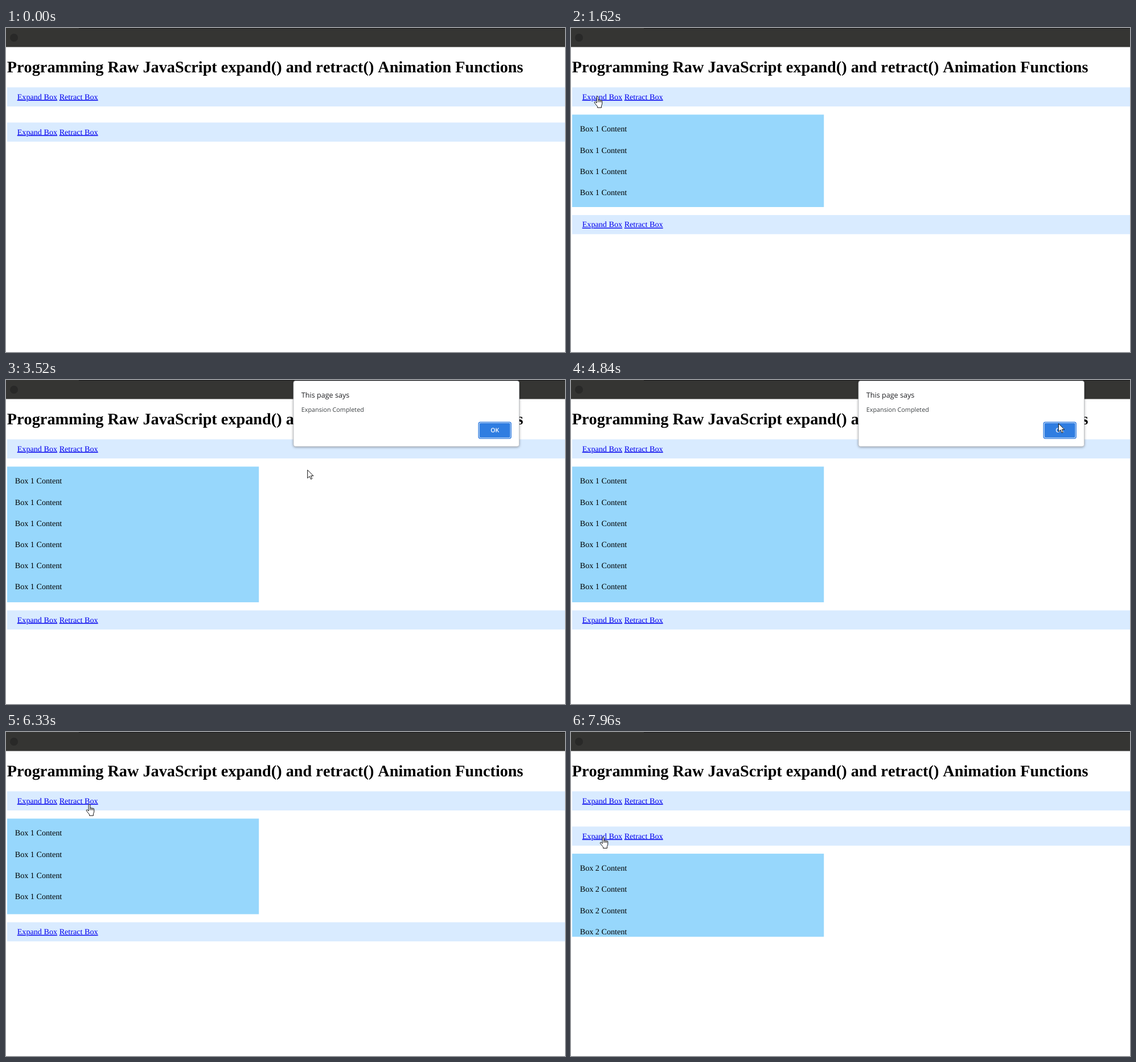
Recreate the animation shown at these times as an HTML page. Size 982x570 px, loop 8000 ms.

```html
<!DOCTYPE html>
<html lang="en">
<head>
<meta charset="utf-8">
<title>expand() and retract()</title>
<style>
  html, body { margin: 0; width: 100%; height: 100%; overflow: hidden; background: #fff; }
  .layer { position: absolute; left: 0; top: 0; width: 982px; height: 570px; overflow: hidden; }
  text { font: 14.16px "Liberation Serif", "Times New Roman", serif; font-kerning: none; text-rendering: geometricPrecision; white-space: pre; }
  .title { font-size: 28.28px; font-weight: bold; }
  .bar rect { fill: #d9ebff; }
  .link { fill: #00e; text-decoration: underline .9px; text-underline-offset: 1.4px; }
  .link.active { fill: #f00; }
  .box rect { fill: #97d7fc; }
  #dialog { transform-origin: 703px 0; }
  #dialog text { font-family: "Open Sans", "Noto Sans", sans-serif; }
  .panel { fill: #fff; stroke: #b9bcc0; stroke-width: .8; filter: drop-shadow(0 1px 2px rgba(0, 0, 0, .35)); }
  #cursor path { fill: #fff; stroke: #000; stroke-width: .95; stroke-linejoin: round; }
  #cursor .crease { fill: none; }
</style>
</head>
<body>
<svg class="layer" id="page" viewBox="0 0 982 570">
  <rect width="982" height="33.5" fill="#353533"/>
  <rect x="128" width="854" height="1" fill="#151515"/>
  <circle cx="14" cy="17" r="7" fill="#292928"/>
  <text class="title" x="1.8" y="78">Programming Raw JavaScript expand() and retract() Animation Functions</text>
</svg>

<svg class="layer" id="dialog" viewBox="0 0 982 570">
  <rect class="panel" x="505" y="1.5" width="396.5" height="115.5" rx="3.5"/>
  <text x="518.8" y="31" style="font-size:12.6px" fill="#202124">This page says</text>
  <text x="518.8" y="56" style="font-size:10.8px" fill="#3c4043">Expansion Completed</text>
  <rect x="829.5" y="73.5" width="58.5" height="30" rx="4" fill="#2b78de"/>
  <rect x="831.3" y="75.3" width="54.9" height="26.4" rx="2.5" fill="#2f7de1" stroke="#d3e5fb" stroke-width="1.1"/>
  <text x="858.7" y="92" text-anchor="middle" style="font-size:10.6px;font-weight:600" fill="#fff">OK</text>
</svg>

<svg class="layer" id="cursor" viewBox="0 0 982 570">
  <g id="arrow"><path d="M.4.6V15l3.5-3.2 2.3 5.1 2.2-1-2.2-4.9h4.5z"/></g>
  <g id="hand">
    <path d="M4.6 12.4V2a1.4 1.4 0 0 1 2.8 0v5.6c.2-1 2.2-1 2.4.2c.3-.9 2-.8 2.3.4c.4-.8 2.1-.6 2.1.9v4.6c0 1.6-1.2 2.6-1.3 4v2.8H6v-1.8C5.2 17.4 2.6 14.4 1 12.2c-1-1.4.6-2.8 2-1.6z"/>
    <path class="crease" d="M7.4 7.6v3.4M9.8 7.8v3.2M12.1 8.2v2.8"/>
  </g>
</svg>

<script>
const LOOP = 8000, NS = "http://www.w3.org/2000/svg";
const BAR_H = 33.6, GAP = 14.16, BAR_Y = 104.4, BOX_W = 442.5, BOX_H = 239;
const $ = id => document.getElementById(id);

function add(parent, tag, attrs, text) {
  const el = document.createElementNS(NS, tag);
  for (const k in attrs) el.setAttribute(k, attrs[k]);
  if (text) el.textContent = text;
  return parent.appendChild(el);
}

function makeBar() {
  const g = add($("page"), "g", { class: "bar" });
  add(g, "rect", { x: 2, width: 980, height: BAR_H });
  const line = add(g, "text", { x: 19.7, y: 21.2 });
  const expand = add(line, "tspan", { class: "link" }, "Expand Box");
  add(line, "tspan", {}, " ");
  const retract = add(line, "tspan", { class: "link" }, "Retract Box");
  return { g, links: [expand, retract] };
}

function makeBox(n) {
  const box = add($("page"), "svg", { class: "box", x: 2, width: BOX_W, height: 0, overflow: "hidden" });
  add(box, "rect", { width: BOX_W, height: BOX_H });
  for (let i = 0; i < 6; i++)
    add(box, "text", { x: 13.7, y: 30.2 + 37.2 * i }, `Box ${n} Content`);
  return box;
}

const bars = [makeBar(), makeBar()];
const boxes = [makeBox(1), makeBox(2)];

const ramp = (t, from, to) => Math.min(1, Math.max(0, (t - from) / (to - from)));
const easeOut = u => 1 - (1 - u) ** 2;
const move = (el, x, y) => el.setAttribute("transform", `translate(${x} ${y})`);

// Cursor moves: start, end, target point
const moves = [
  [70, 130, 84, 258], [290, 910, 46.5, 120], [2420, 2980, 131, 126], [3445, 3670, 848, 183],
  [3825, 4050, 852, 109], [4293, 4600, 856, 76], [4920, 5930, 146.5, 127],
  [6560, 6720, 133, 208], [6720, 6940, 109, 224], [6940, 7340, 56.5, 184.3]
];
const clicks = [1060, 6180, 7660];

function cursorAt(t) {
  let x = 235, y = 334;
  for (const [from, to, tx, ty] of moves) {
    const u = easeOut(ramp(t, from, to));
    x += (tx - x) * u;
    y += (ty - y) * u;
  }
  return [x, y];
}

function draw(now) {
  const t = now % LOOP;

  const heights = [ramp(t, 1065, 1880) - ramp(t, 6200, 6640), ramp(t, 7680, 8138)].map(v => v * BOX_H);
  const [x, y] = cursorAt(t);
  const pressed = clicks.some(c => t >= c && t < c + 70);
  let hand = false, top = BAR_Y;

  bars.forEach((bar, i) => {
    move(bar.g, 0, top);
    const over = y > top + 9 && y < top + 25 && x > 19 && x < 162;
    hand ||= over;
    bar.links.forEach((link, k) => link.classList.toggle("active", pressed && over && k === (x > 92 ? 1 : 0)));
    top += BAR_H + GAP;
    boxes[i].setAttribute("y", top);
    boxes[i].setAttribute("height", heights[i]);
    top += heights[i] + GAP;
  });

  // The dialog swings in from above and back out
  const shown = easeOut(ramp(t, 1885, 2165)) - ramp(t, 4900, 5130), away = 1 - shown;
  const d = $("dialog").style;
  d.visibility = shown > 0 ? "visible" : "hidden";
  d.opacity = shown;
  d.transform = away ? `translateY(${-33 * away}px) perspective(1000px) rotateX(${20 * away}deg)` : "none";

  $("cursor").style.visibility = t < 70 ? "hidden" : "visible";
  $("arrow").style.display = hand ? "none" : "";
  $("hand").style.display = hand ? "" : "none";
  move($("arrow"), x, y);
  move($("hand"), x - 6, y - .4);
}

let start;
function loop(now) {
  start ??= now;
  draw(now - start);
  requestAnimationFrame(loop);
}
draw(0);
requestAnimationFrame(loop);
</script>
</body>
</html>
```
